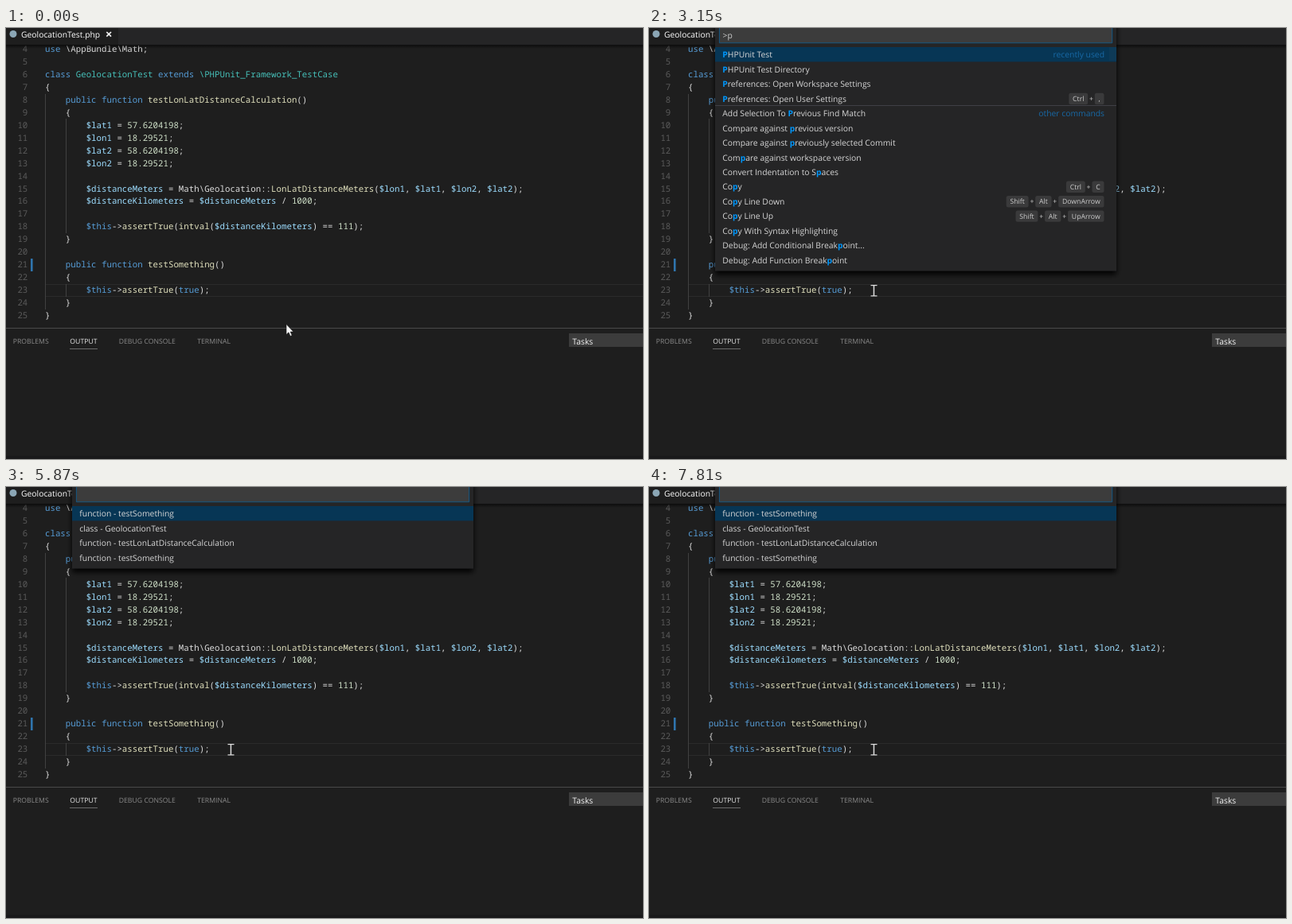
Write an HTML page with a canvas that moves like this. It is 800 px wide and 542 px high and loops after 8 s.

```html
<!DOCTYPE html>
<html lang="en">
<head>
<meta charset="utf-8">
<title>Editor command palette</title>
<style>
html, body { margin: 0; width: 100%; height: 100%; overflow: hidden; background: #1e1e1e; }
canvas { display: block; }
</style>
</head>
<body>
<canvas id="stage" width="800" height="542"></canvas>
<script>
const ctx = document.getElementById('stage').getContext('2d');
const LOOP = 8000, CHAR = 6.456, LINE = 15.93, ROW = 18.45, LEFT = 49;
const MONO = '10.76px "Noto Sans Mono", monospace';
const ui = (size = 10.35, weight = 400) => `${weight} ${size}px "Open Sans", sans-serif`;

const code = String.raw`use \AppBundle\Math;

class GeolocationTest extends \PHPUnit_Framework_TestCase
{
    public function testLonLatDistanceCalculation()
    {
        $lat1 = 57.6204198;
        $lon1 = 18.29521;
        $lat2 = 58.6204198;
        $lon2 = 18.29521;

        $distanceMeters = Math\Geolocation::LonLatDistanceMeters($lon1, $lat1, $lon2, $lat2);
        $distanceKilometers = $distanceMeters / 1000;

        $this->assertTrue(intval($distanceKilometers) == 111);
    }

    public function testSomething()
    {
        $this->assertTrue(true);
    }
}`.split('\n');

// keyword, variable, number, type, function call, anything else
const TOKEN = /(\b(?:use|class|extends|public|function|true)\b|\$this)|(\$\w+)|(\b\d[\d.]*)|(\\PHPUnit\w+|\bGeolocationTest\b)|(\w+(?=\())|\w+|\S/g;
const COLORS = ['#569cd6', '#9cdcfe', '#cfe0c8', '#46bfb8', '#dfdfbc'];

// Rows are [label, keys, group]; text between asterisks is a highlighted match.
const all = {
  query: '>', rows: [
    ['PHPUnit Test', '', 'recently used'],
    ['PHPUnit Test Directory'],
    ['Preferences: Open Workspace Settings'],
    ['Preferences: Open User Settings', 'Ctrl ,'],
    ['Add Cursor Above', 'Ctrl Alt UpArrow', 'other commands'],
    ['Add Cursor Below', 'Ctrl Alt DownArrow'],
    ['Add Cursors to Line Ends', 'Shift Alt I'],
    ['Add Line Comment'],
    ['Add Selection To Next Find Match', 'Ctrl D'],
    ['Add Selection To Previous Find Match'],
    ['Change All Occurrences', 'Ctrl F2'],
    ['Change End of Line Sequence'],
    ['Change File Encoding'],
    ['Change Language Mode'],
    ['Clear Command History']
  ]
};
const matchP = {
  query: '>p', rows: [
    ['*P*HPUnit Test', '', 'recently used'],
    ['*P*HPUnit Test Directory'],
    ['*P*references: Open Workspace Settings'],
    ['*P*references: Open User Settings', 'Ctrl ,'],
    ['Add Selection To *P*revious Find Match', '', 'other commands'],
    ['Compare against *p*revious version'],
    ['Compare against *p*reviously selected Commit'],
    ['Com*p*are against workspace version'],
    ['Convert Indentation to S*p*aces'],
    ['Co*p*y', 'Ctrl C'],
    ['Co*p*y Line Down', 'Shift Alt DownArrow'],
    ['Co*p*y Line Up', 'Shift Alt UpArrow'],
    ['Co*p*y With Syntax Highlighting'],
    ['Debug: Add Conditional Break*p*oint...'],
    ['Debug: Add Function Break*p*oint']
  ]
};
const matchPhp = {
  query: '>php', rows: [
    ['*PHP*Unit Test', '', 'recently used'],
    ['*PHP*Unit Test Directory']
  ]
};
const tests = {
  query: '', rows: [
    ['function - testSomething'],
    ['class - GeolocationTest'],
    ['function - testLonLatDistanceCalculation'],
    ['function - testSomething']
  ]
};

// Each track lists [start time, value].
const menuTrack = [[0, null], [2610, all], [3150, matchP], [3270, matchPhp], [4680, null], [4910, tests]];
const selTrack = [[0, 0], [5980, 1], [6410, 2], [7060, 1], [7270, 0]];
const caretTrack = [[0, 0], [970, 1], [1520, 0], [1950, 1], [2930, 0], [3270, 1], [4240, 0],
  [4680, 1], [5870, 0], [6300, 1], [6850, 0], [7380, 1], [7810, 0]];
const barTrack = [[0, 0], [2830, 0.03], [2930, 0.06], [3270, 0]];
const mouseTrack = [[0, [352, 372.5]], [120, [343, 358]], [230, [322, 341]], [340, [303, 328]],
  [440, [291, 323]], [550, [284, 327]], [660, [282, 330]]];

const at = (track, t) => track.filter(([start]) => start <= t).pop()[1];

function rect(x, y, w, h, color) {
  ctx.fillStyle = color;
  ctx.fillRect(x, y, w, h);
}

function text(str, x, y, color, font = ui()) {
  ctx.font = font;
  ctx.fillStyle = color;
  ctx.fillText(str, x, y);
  return ctx.measureText(str).width;
}

function textRight(str, x, y, color, font = ui()) {
  ctx.font = font;
  text(str, x - ctx.measureText(str).width, y, color, font);
}

function stroke(points, color, width) {
  ctx.beginPath();
  points.forEach(([x, y]) => ctx.lineTo(x, y));
  ctx.strokeStyle = color;
  ctx.lineWidth = width;
  ctx.stroke();
}

function drawCode() {
  for (const y of [322, 337]) rect(LEFT, y, 751, 1, '#2b2b2b');
  rect(49, 83, 1, 271, '#404040');
  rect(75, 114, 1, 144, '#404040');
  rect(75, 322, 1, 16, '#404040');
  rect(31, 290, 2.6, 16, '#2f74ad');
  code.forEach((line, i) => {
    const y = 30.3 + i * LINE;
    textRight(String(i + 4), 27.3, y, '#5a5a5a', MONO);
    for (const m of line.matchAll(TOKEN)) {
      const color = COLORS[m.slice(1).findIndex(Boolean)] || '#dcdcdc';
      [...m[0]].forEach((c, k) => text(c, LEFT + (m.index + k) * CHAR, y, color, MONO));
    }
  });
}

function drawTabs() {
  rect(0, 0, 800, 22, '#252526');
  rect(0, 0, 141, 22, '#1e1e1e');
  const shade = ctx.createLinearGradient(0, 21, 0, 26);
  shade.addColorStop(0, 'rgba(0,0,0,.6)');
  shade.addColorStop(1, 'rgba(0,0,0,0)');
  rect(0, 21, 800, 5, shade);
  ctx.beginPath();
  ctx.arc(9, 7.5, 4.5, 0, 7);
  ctx.fillStyle = '#8ba6b5';
  ctx.fill();
  text('GeolocationTest.php', 19, 11.8, '#fff');
  stroke([[126.3, 5], [132, 10.7]], '#f2f2f2', 1.7);
  stroke([[132, 5], [126.3, 10.7]], '#f2f2f2', 1.7);
}

function drawPanel() {
  rect(0, 377, 800, 1, '#4a4a4a');
  const tabs = [['PROBLEMS', 8.7], ['OUTPUT', 80.3], ['DEBUG CONSOLE', 141.7], ['TERMINAL', 240.2]];
  for (const [name, x] of tabs)
    text(name, x, 396.5, name === 'OUTPUT' ? '#e7e7e7' : '#8a8a8a', ui(8.7));
  rect(80, 403, 35, 1, '#6b6b6b');
  rect(707, 384, 93, 17, '#3c3c3c');
  text('Tasks', 711.3, 397.6, '#f4f4f4');
  rect(0, 538, 800, 4, '#19191a');
}

function drawKeys(keys, mid) {
  let x = 571.5;
  keys.split(' ').reverse().forEach((key, i) => {
    if (i) {
      text('+', x - 6.8, mid + 3.2, '#ccc', ui(8.7));
      x -= 8.6;
    }
    ctx.font = ui(8.7);
    const w = ctx.measureText(key).width + 9.6;
    x -= w;
    ctx.beginPath();
    ctx.roundRect(x, mid - 7.2, w, 14.4, 2.5);
    ctx.fillStyle = '#3a3a3b';
    ctx.fill();
    text(key, x + 4.8, mid + 3.2, '#ccc', ui(8.7));
  });
}

function drawMenu({ query, rows }, sel, caret, bar) {
  ctx.save();
  ctx.shadowColor = '#000';
  ctx.shadowBlur = 7;
  ctx.shadowOffsetY = 4;
  rect(83, -10, 504, 38.8 + rows.length * ROW, '#252526');
  ctx.restore();

  rect(88, 0, 494, 19, '#3c3c3c');
  stroke([[88.4, -1], [88.4, 18.8], [581.7, 18.8], [581.7, -1]], '#0d5c90', 0.84);
  const end = 92.5 + text(query, 92.5, 13, '#ccc');
  if (caret) rect(Math.floor(end), 1, 1, 15, '#bbb');

  rows.forEach(([label, keys, group], i) => {
    const top = 24 + i * ROW, mid = top + 9.7;
    if (i === sel) rect(83, top, 504, ROW, '#073655');
    if (group && i) rect(83, Math.round(top - 0.5), 504, 1, '#3f3f46');
    let x = 92.3;
    label.split('*').forEach((part, k) => {
      x += k % 2 ? text(part, x, mid + 3.7, '#0097fb', ui(10.35, 700)) : text(part, x, mid + 3.7, '#d6d6d6');
    });
    if (keys) drawKeys(keys, mid);
    if (group) textRight(group, 572, mid + 3.7, '#1869a6');
  });
  if (bar) rect(578, 24, 9, 17, `rgba(121,121,121,${bar})`);
}

function drawMouse([x, y]) {
  if (y > 370) {
    const shape = [[0, 0], [0, 13], [3, 10.3], [5, 15], [7.2, 14], [5.2, 9.6], [9, 9.4]];
    ctx.beginPath();
    shape.forEach(([dx, dy]) => ctx.lineTo(x + dx, y + dy));
    ctx.closePath();
    ctx.fillStyle = '#f4f4f4';
    ctx.fill();
    ctx.strokeStyle = '#111';
    ctx.lineWidth = 0.6;
    ctx.stroke();
  } else {
    rect(x - 0.3, y - 6.5, 1.5, 13.5, '#ddd');
    for (const dy of [-7, 6.3]) rect(x - 3.5, y + dy, 8, 1.2, '#ddd');
  }
}

function draw(now) {
  const t = now % LOOP;
  const menu = at(menuTrack, t), caret = at(caretTrack, t);
  ctx.textRendering = 'geometricPrecision';
  rect(0, 0, 800, 542, '#1e1e1e');
  drawCode();
  drawTabs();
  drawPanel();
  if (menu) drawMenu(menu, at(selTrack, t), caret, at(barTrack, t));
  else if (caret) rect(255.3, 321.6, 1.6, 16, '#e0e0e0');
  drawMouse(at(mouseTrack, t));
}

const start = performance.now();
function tick() {
  draw(performance.now() - start);
  requestAnimationFrame(tick);
}
tick();
</script>
</body>
</html>
```
